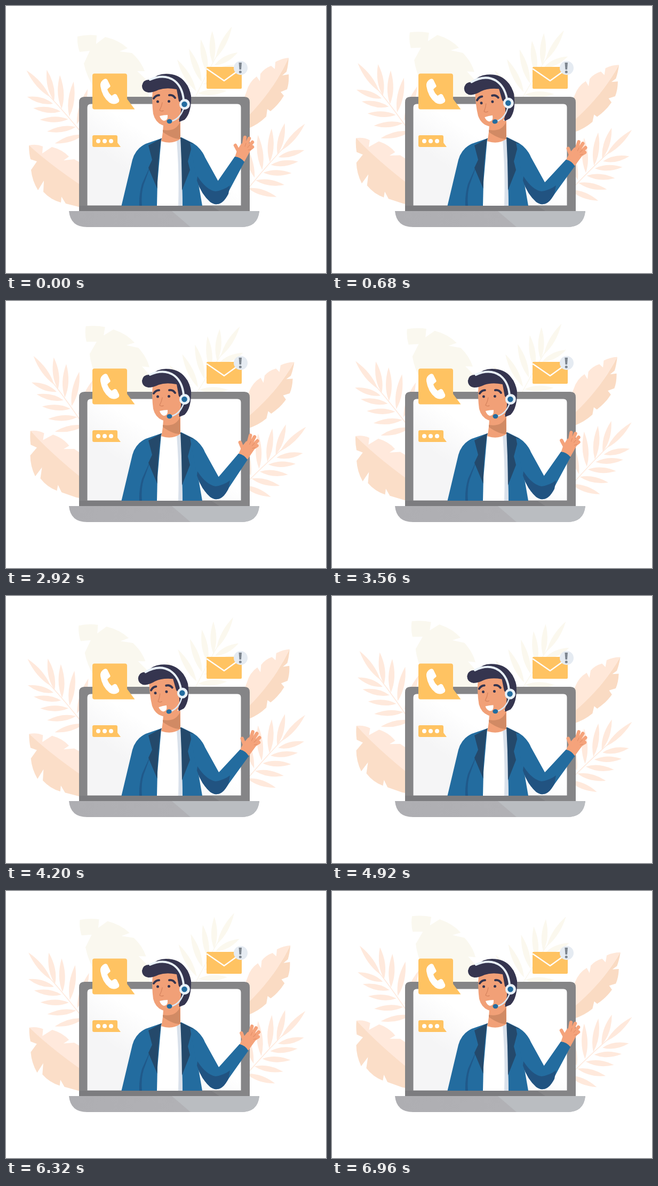
Animation of 600 by 500 pixels, one loop 7000 ms. Source, as an HTML page:

```html
<!DOCTYPE html>
<html lang="en">
<head>
<meta charset="utf-8">
<title>Support call</title>
<style>
html, body { margin: 0; width: 100%; height: 100%; overflow: hidden; background: #fff; }
svg { display: block; width: 600px; height: 500px; }
.line { fill: none; stroke-linecap: round; stroke-linejoin: round; }
</style>
</head>
<body>
<svg viewBox="0 0 600 500">
  <defs>
    <linearGradient id="glass" x1="0" y1="1" x2="1" y2="0">
      <stop offset=".3" stop-color="#f5f5f6"/><stop offset=".55" stop-color="#fff"/>
    </linearGradient>
    <linearGradient id="base">
      <stop offset="0" stop-color="#aeaeb2"/><stop offset="1" stop-color="#b3b3b7"/>
    </linearGradient>
    <clipPath id="baseClip"><path d="M118 384H475Q472 414 441 414H152Q121 414 118 384Z"/></clipPath>
    <g id="fern"></g>
  </defs>

  <!-- foliage -->
  <g class="sway" data-pivot="244 217">
    <path fill="#faf8ef" d="M134 57Q152 53 170 55L169 71L186 58Q212 64 228 79L213 85L236 88Q253 103 260 122L246 122L262 137L272 190L200 190Q156 155 146 108L157 84L138 86Q133 72 134 57Z"/>
  </g>
  <g class="sway" data-pivot="334 198" color="#fbf8ee">
    <use href="#fern" transform="translate(424 38) rotate(-14) scale(-1 1) translate(-38 -120)"/>
  </g>
  <g class="sway" data-pivot="228 250" color="#ffe9dc"><use href="#fern"/></g>
  <g class="sway" data-pivot="401 249" color="#ffe9dc">
    <use href="#fern" transform="translate(599 100) scale(-1 1)"/>
  </g>
  <g class="sway" data-pivot="233 282">
    <path fill="#ffe9dc" d="M43 261Q57 258 69 263L68 276L86 264Q106 269 118 282L108 289L128 287L170 310V360Q80 310 43 261Z"/>
    <path fill="#fbdec8" d="M43 261Q43 275 46 287L58 291L47 307Q49 327 60 345L71 327L70 348Q84 363 103 368L104 357L112 370L140 377L170 380V355Q90 304 43 261Z"/>
  </g>
  <g class="sway" data-pivot="350 217">
    <path fill="#ffe8d9" d="M530 97Q517 98 505 105L504 118L497 112Q484 117 477 127L476 141L470 132Q456 142 451 160L440 190V222Q495 170 530 97Z"/>
    <path fill="#fadbc3" d="M530 97Q529 112 526 123L518 130L530 128Q531 144 527 156L515 161L521 168Q512 184 496 197L490 193L488 207Q474 221 455 229L430 236V229Q495 172 530 97Z"/>
  </g>

  <!-- laptop -->
  <path fill="#858587" d="M137 384V180Q137 170 147 170H447Q457 170 457 180V384Z"/>
  <path fill="#7c7c7f" d="M152 374H385L400 384H137V374Z"/>
  <path fill="url(#glass)" d="M152.500 373.500V190Q152.500 183.500 159 183.500H434Q440.500 183.500 440.500 190V373.500Z"/>

  <!-- torso -->
  <path fill="#236c9f" d="M216.500 374L237 288Q243 267 262 258L291 248L329 246L351 257Q366 266 372 283L359 322L368 374Z"/>
  <path fill="#20598a" d="M274 291L255 333Q249 354 250 374H255Q253 353 258 335Z"/>
  <path fill="#fff" d="M291 250L328 248L331 374H283L284 330Z"/>
  <path fill="#d9e1eb" d="M320 252L328 250L331 374H323Q325 310 320 252Z"/>
  <path fill="#24496b" d="M291 248L267 261L274 288L267 303L283.500 342Q284 290 291 248Z"/>
  <path fill="#24496b" d="M327 246L350 257L341 291L345 307L330 345Q330 295 327 246Z"/>
  <path fill="#f1a077" d="M295 215H327V249Q311 260 291 253Q295 238 295 215Z"/>
  <path fill="#d18a64" d="M294 232Q318 236 326 218L327 249Q314 250 294 236Z"/>

  <!-- waving arm -->
  <path fill="#236c9f" d="M345 256Q366 265 373 283L399 330L396 371Q390 372 383 367Q366 352 358 327Z"/>
  <g id="arm">
    <g class="line" stroke="#f5a37b" stroke-width="6.5">
      <path fill="#f5a37b" stroke-width="3" d="M431 282L435 270L442 259Q457 258 457 270L446 290Z"/>
      <path d="M445 264L448 246M449 264L456 248M452 267L462 255M452 272L462 264M438 276L430 261"/>
    </g>
    <path class="line" stroke="#e08c66" d="M450 257L448 263M457 260L453 265M459 268L454 270"/>
    <path fill="#236c9f" d="M397 328L429 282Q440 283 447 292L414 354Q406 371 394 371Q380 368 376 352Z"/>
  </g>
  <path fill="#215381" d="M359 319Q376 345 393 347Q408 345 420 336L417 352Q407 371 396 371Q390 372 383 367Q366 352 358 327Z"/>

  <!-- head -->
  <g id="head">
    <path fill="#35354f" d="M300 140Q342 136 347 168Q348 200 335 213L325 217L316 180Z"/>
    <path fill="#f1a077" d="M275 157Q300 146 322 152L328 182Q330 212 317 222Q307 228 293 223Q280 218 276 202Q273 180 275 157Z"/>
    <path fill="#35354f" d="M267 162Q255 160 255 149Q257 138 268 138L274 138Q283 127 300 127Q324 127 336 143Q346 154 346 172L330 184L324 178L320 156Q300 152 286 157Q276 162 267 162Z"/>
    <g class="line">
      <path stroke="#35354f" stroke-width="4" d="M277 173Q281 167 287 167M306 167Q313 166 317 172"/>
      <path stroke="#d98761" stroke-width="1.5" d="M293 181Q292 188 288 195Q291 198 295 196"/>
      <path stroke="#e9f2fa" stroke-width="4" d="M270 138Q297 126 316 140Q331 152 333 176"/>
      <path stroke="#dce8f3" stroke-width="2.5" d="M333 192Q326 212 309 216"/>
    </g>
    <circle cx="284.500" cy="179" r="2.500" fill="#35354f"/>
    <circle cx="305.500" cy="178.500" r="2.500" fill="#35354f"/>
    <path fill="#fff" d="M288 206Q296 204 303 204Q304 215 296 215Q290 213 288 206Z"/>
    <circle cx="335" cy="184" r="10" fill="#e9f2fa"/>
    <circle cx="334.500" cy="184" r="5.300" fill="#236c9f"/>
    <ellipse cx="306.500" cy="216" rx="5" ry="4.200" fill="#236c9f"/>
  </g>

  <g clip-path="url(#baseClip)">
    <path fill="url(#base)" d="M118 384H475V414H118Z"/>
    <path fill="#babdc1" d="M311 384H475V414H346Z"/>
  </g>

  <!-- notices -->
  <g fill="#ffc362">
    <path d="M166 126.500H223Q227 126.500 227 130.500V174L241.500 193.500H166Q162 193.500 162 189.500V130.500Q162 126.500 166 126.500Z"/>
    <path d="M165 242H206Q209 242 209 245V256L215 264H165Q162 264 162 261V245Q162 242 165 242Z"/>
    <rect x="376" y="114" width="66" height="41" rx="2"/>
  </g>
  <g fill="#fff">
    <path d="M184 137Q188 135 190 138L195 148Q197 151 193 153L190 156Q192 163 198 168L203 165Q206 164 208 167L212 175Q213 179 210 181Q203 186 194 181Q180 170 177 150Q176 141 184 137Z"/>
    <circle cx="173" cy="253" r="4"/><circle cx="185" cy="253" r="4"/><circle cx="197" cy="253" r="4"/>
  </g>
  <path class="line" stroke="#fff" stroke-width="2.500" d="M377 118L409 140L441 117"/>
  <circle cx="440" cy="116" r="13" fill="#e5ebf2"/>
  <path fill="#7f8790" d="M436.500 106H442L441 119H437.500Z"/>
  <circle cx="439.300" cy="123.500" r="2.500" fill="#7f8790"/>
</svg>
<script>
const $ = s => document.querySelector(s);
const LOOP = 7000, WAVE = 3500;

// A pointed leaflet from its base along an angle in degrees.
function leaflet(x, y, deg, len, width) {
  const a = deg * Math.PI / 180, c = Math.cos(a), s = Math.sin(a);
  const side = k => `${x + c * len * .45 - s * k} ${y + s * len * .45 + c * k}`;
  const tip = `${x + c * len} ${y + s * len}`;
  return `M${x} ${y}Q${side(width)} ${tip}Q${side(-width)} ${x} ${y}`;
}

function buildFern() {
  let d = leaflet(82, 170, 228.700, 66, 10);
  for (let i = 0; i < 5; i++) {
    const x = 89 + i * 14.300, y = 181 + i * 14.500;
    d += leaflet(x + 1, y - 3, 257 + i * 10, 60 + i * 3, 11);
    d += leaflet(x - 1, y + 2, 195 - i * 8, 50 + i * 1.500, 10.500);
  }
  $('#fern').innerHTML = `<path fill="currentColor" d="${d}"/>
    <path class="line" stroke="currentColor" stroke-width="1.500" d="M78 165Q115 204 155 254"/>`;
}

const smooth = (t, a, b) => {
  const u = Math.min(1, Math.max(0, (t - a) / (b - a)));
  return u * u * (3 - 2 * u);
};
const turn = (el, deg, pivot) => el.setAttribute('transform', `rotate(${deg} ${pivot})`);
const leaves = document.querySelectorAll('.sway');

function draw(now) {
  const t = now % LOOP, p = t % WAVE;
  // Gentle back-and-forth, cut hard at the loop's end.
  const linear = 1 - Math.abs(t % 2000 / 1000 - 1);
  const sway = (linear + (1 - Math.cos(Math.PI * linear)) / 2) / 2;
  leaves.forEach(el => turn(el, 5.700 * sway, el.dataset.pivot));

  const tilt = smooth(p, 0, 600) - .9 * smooth(p, 850, 1600) - .1 * smooth(p, 2200, 2800);
  turn($('#head'), -5.700 * tilt, '310 225');
  turn($('#arm'), 8 * (smooth(p, 0, 600) - smooth(p, 2700, 3300)), '395 355');
}

buildFern();
const start = performance.now();
(function frame() {
  draw(performance.now() - start);
  requestAnimationFrame(frame);
})();
</script>
</body>
</html>
```
